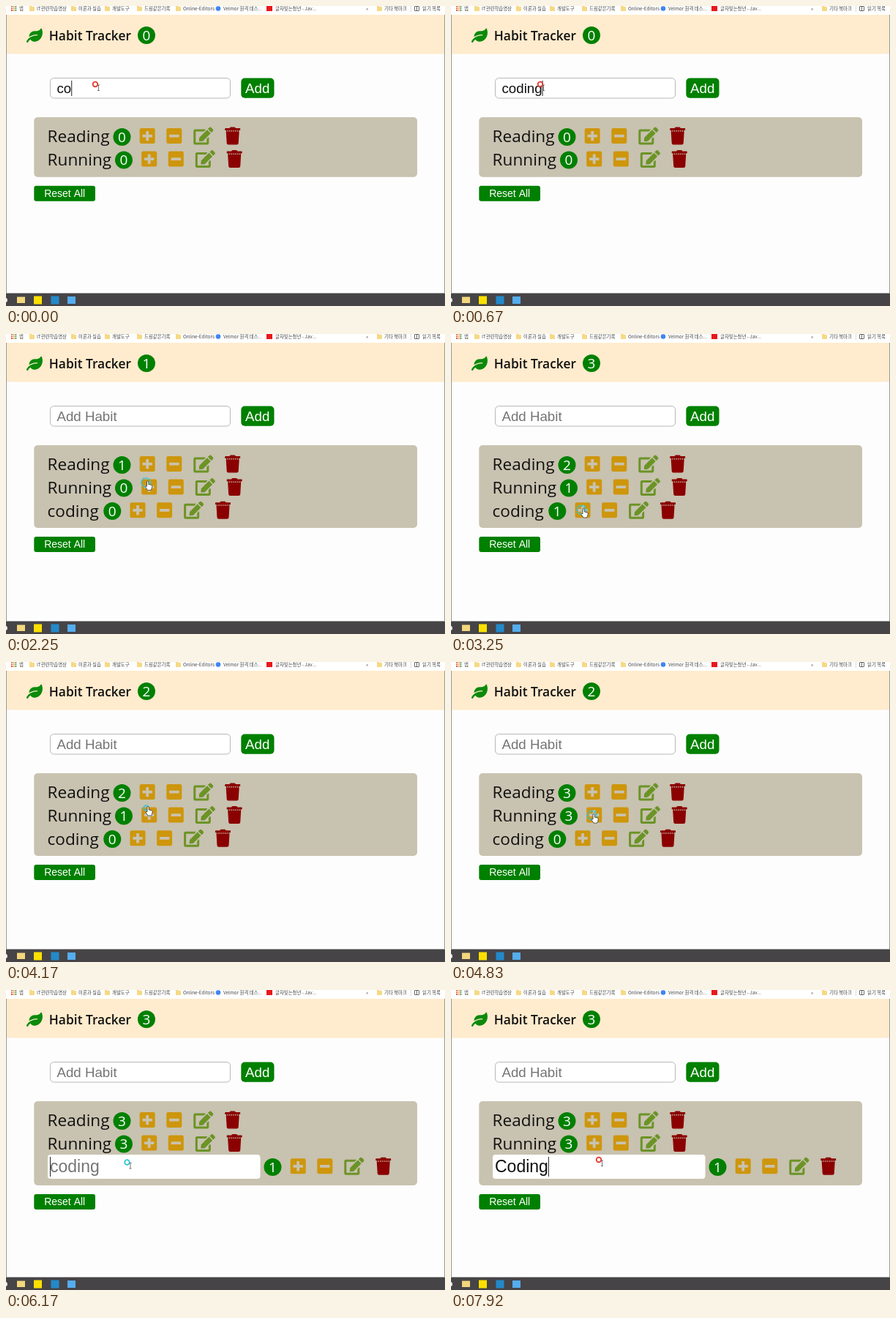
Write an HTML page with a canvas that moves like this. It is 600 by 410 pixels and loops after 8000 ms.

```html
<!DOCTYPE html>
<html lang="ko">
<head>
<meta charset="utf-8">
<title>Habit Tracker</title>
<style>
html, body { margin: 0; width: 100%; height: 100%; overflow: hidden; background: #fefdfe; }
canvas { display: block; width: 600px; height: 410px; }
</style>
</head>
<body>
<canvas id="stage"></canvas>
<script>
const LOOP = 8000, ADDED = 1000, EDITING = 5750, ENGLISH = 6500;
const GREEN = '#008000', PANEL = '#c8c2b0', FOLDER = '#f6d983';
const SANS = '"Open Sans", sans-serif';
const ARIAL = '"Liberation Sans", Arial, sans-serif';
const KOREAN = '"Noto Sans CJK KR", "Noto Sans CJK", sans-serif';

const canvas = document.getElementById('stage');
const ctx = canvas.getContext('2d');
const dpr = window.devicePixelRatio || 1;
canvas.width = 600 * dpr;
canvas.height = 410 * dpr;

// Icons are drawn on a 512-unit high grid.
const LEAF = new Path2D('M546 10c-6-13-22-13-28-1C487 62 431 96 368 96h-80C182 96 96 182 96 288c0 7 1 14 1.500 20.500C161 263 253 224 384 224c9 0 16 7 16 16s-7 16-16 16C133 256 26 410 2 468c-6 16 1 35 18 42 16 6 35-1 42-18 1-4 21-48 72-90 32 44 94 86 175 77C465 467 576 327 576 154c0-50-11-102-30-144z');
const PENCIL = new Path2D('M403 83l90 90c4 4 4 10 0 14L274 406l-93 10c-12 1-22-9-21-22l10-92L389 83c4-4 10-4 14 0zM565 60l-49-49c-15-15-40-15-55 0l-36 36c-4 4-4 10 0 14l90 90c4 4 10 4 14 0l36-36c15-15 15-40 0-55zM384 346V448H64V128h230c3 0 6-1 8-3l40-40c8-8 3-21-8-21H48C21 64 0 85 0 112v352c0 27 21 48 48 48h352c27 0 48-21 48-48V306c0-11-13-16-20-8l-40 40c-3 2-4 5-4 8z');
const TRASH = new Path2D('M432 32H312l-9-19Q296 0 281 0H167Q152 0 145 13L136 32H16Q0 32 0 48v32q0 16 16 16h416q16 0 16-16V48q0-16-16-16zM53 467q3 45 48 45h246q45 0 48-45L416 128H32z');
for (let x = 40; x < 416; x += 56) TRASH.rect(x, 96, 28, 32);
const HAND = new Path2D('M-3-6Q-1.800-7-.700-6V-2L3-1.200Q4.500-.700 4.300 1L3.500 4 2.500 6H-2L-5 1.500Q-5-.200-3 .800z');
const ARROW = new Path2D('M-4-5V5l2.500-2 1.700 4 2-1-1.700-3.700H3z');

// Pointer stops: time, x, y
const PATH = [
  [0, 126.5, 111.5], [670, 126.5, 111.5], [1000, 334.5, 115], [1170, 334.5, 115],
  [1500, 197, 181], [1750, 197, 181], [2200, 195.5, 207.5], [2420, 195.5, 207.5],
  [2700, 196, 183], [2850, 196, 183], [3080, 183, 245], [3300, 183, 245],
  [3600, 220, 245], [4000, 220, 245], [4170, 196, 204], [4300, 196, 183],
  [4420, 196, 183], [4620, 198, 212], [4800, 198, 212], [5000, 183, 245],
  [5120, 183, 245], [5450, 258, 247], [5750, 258, 247], [6170, 170, 240],
  [7915, 170, 240], [7915, 206.5, 236.5], [LOOP, 206.5, 236.5]
];
// Counter clicks: time, row, change
const CLICKS = [
  [1580, 0, 1], [2330, 1, 1], [2750, 0, 1], [3250, 2, 1], [4000, 2, -1],
  [4330, 0, 1], [4670, 1, 1], [4750, 1, 1], [5080, 2, 1]
];
const ROWS = [['Reading', 158.5, 177.6], ['Running', 161, 209.1], ['coding', 145.3, 240.8]];
const FIRST_KEYS = [0, 0, 80, 170, 250, 330];
const EDIT_KEYS = [7000, 7170, 7330, 7415, 7500, 7670];

const typed = (word, times, t) => word.slice(0, times.filter(k => t >= k).length);

function rect(x, y, w, h, color, r = 0, border) {
  ctx.beginPath();
  ctx.roundRect(x, y, w, h, r);
  ctx.fillStyle = color;
  ctx.fill();
  if (border) {
    ctx.strokeStyle = border;
    ctx.lineWidth = 1;
    ctx.stroke();
  }
}

function circle(x, y, r, color) {
  ctx.beginPath();
  ctx.arc(x, y, r, 0, 7);
  ctx.fillStyle = color;
  ctx.fill();
}

function text(str, x, y, font, color, align = 'left') {
  ctx.font = font;
  ctx.fillStyle = color;
  ctx.textAlign = align;
  ctx.fillText(str, x, y);
  return ctx.measureText(str).width;
}

function icon(path, x, y, size, color) {
  ctx.save();
  ctx.translate(x, y);
  ctx.scale(size / 512, size / 512);
  ctx.fillStyle = color;
  ctx.fill(path);
  ctx.restore();
}

function badge(x, y, n) {
  circle(x, y, 12, GREEN);
  text(n, x, y + 7, '19px ' + SANS, '#fff', 'center');
}

function square(x, y, plus) {
  rect(x - 10.5, y - 10.5, 21, 21, '#ce960c', 2.3);
  rect(x - 6.7, y - 1.9, 13.4, 3.8, PANEL, 0.5);
  if (plus) rect(x - 1.9, y - 6.7, 3.8, 13.4, PANEL, 0.5);
}

function folder(x) {
  rect(x, 0, 3.5, 2, FOLDER);
  rect(x, 1, 7, 6, FOLDER, 0.5);
}

function drawBrowser() {
  rect(0, 0, 600, 12, '#fff');
  const label = (str, x) => text(str, x, 5.7, '6.4px ' + KOREAN, '#444');
  for (let i = 0; i < 9; i++)
    rect(7 + i % 3 * 2.7, Math.floor(i / 3) * 2.7 - 0.3, 1.9, 1.9, ['#e2574c', '#e9a23b', '#5a9a62'][i % 3]);
  label('앱', 18);
  const marks = [[32, 'IT관련학습영상'], [89, '이론과 실습'], [135, '개발도구'],
    [179, '드림같은기록'], [232, 'Online-Editors'], [507, '기타 북마크']];
  for (const [x, name] of marks) {
    folder(x);
    label(name, x + 10);
  }
  circle(290, 3.5, 3.3, '#4285f4');
  label('Velmor 원격 데스...', 297);
  rect(356, 0, 8, 7, '#e8191c');
  label('글자빚는청년 - Jav...', 368);
  label('»', 492);
  rect(553, 0, 0.7, 8, '#ccc');
  rect(558.5, 0.5, 6, 6, '#fff', 0.5, '#666');
  rect(561, 0, 1, 7, '#666');
  label('읽기 목록', 569);

  rect(0, 392.6, 600, 17.4, '#464446');
  circle(-1.5, 402, 3.5, '#eee');
  rect(15, 397.5, 11, 8.5, '#f4d77c');
  rect(38, 396.5, 11, 11, '#fae100');
  rect(61.5, 396.5, 11, 11, '#2489ca');
  rect(84, 397, 11, 10, '#55acee');
}

function drawHeader(total) {
  rect(0, 12, 600, 53.5, '#ffebcd');
  icon(LEAF, 28, 30.5, 19.5, '#0b8a0b');
  text('Habit Tracker', 58.8, 46.7, '600 17.4px ' + SANS, '#111');
  badge(192, 40, total);
}

function caret(x, y, h) {
  rect(x, y, 1, h, '#222');
}

function drawForm(t) {
  const font = '18.7px ' + ARIAL;
  rect(60.5, 98.5, 246, 27.5, '#fff', 5, '#b8b8b8');
  if (t < ADDED) {
    const w = text(typed('coding', FIRST_KEYS, t), 69.5, 118.7, font, '#111');
    caret(69.5 + w, 102, 21);
  } else {
    text('Add Habit', 69.5, 118.7, font, '#757575');
  }
  rect(321.3, 98.5, 45.2, 27.2, GREEN, 5);
  text('Add', 343.7, 118.5, font, '#fff', 'center');
}

function drawEditor(t) {
  const font = '23px ' + ARIAL;
  rect(57, 225, 290.5, 33, '#fff', 4);
  const value = typed('Coding', EDIT_KEYS, t);
  const w = text(value || 'coding', 60, 249.3, font, value ? '#111' : '#757575');
  const blinkedOff = t >= 6670 && t < 7000;
  if (!blinkedOff) caret(60 + (value ? w : 0), 228, 27);
}

function drawList(t, counts) {
  const editing = t >= EDITING;
  const bottom = editing ? 267 : t >= ADDED ? 265 : 233.7;
  rect(38.3, 152, 523.7, bottom - 152, PANEL, 5);
  ROWS.forEach(([name, badgeX, y], i) => {
    if (i === 2 && t < ADDED) return;
    let x = badgeX;
    if (i === 2 && editing) {
      drawEditor(t);
      x = 364.5;
    } else {
      text(name, 56.6, y + 8.7, '22.6px ' + SANS, '#111');
    }
    badge(x, y + 1.3, counts[i]);
    square(x + 34.7, y, true);
    square(x + 71.3, y, false);
    icon(PENCIL, x + 97.8, y - 12, 24, '#6b9426');
    icon(TRASH, x + 140.7, y - 12, 24, '#8b0000');
  });
  rect(38.3, bottom + 12, 83.7, 21, GREEN, 3);
  text('Reset All', 80.2, bottom + 27, '14px ' + ARIAL, '#fff', 'center');
}

function pointerAt(t) {
  const i = Math.max(1, PATH.findIndex(p => p[0] > t));
  const [t0, x0, y0] = PATH[i - 1], [t1, x1, y1] = PATH[i];
  const u = (t - t0) / (t1 - t0), e = u * u * (3 - 2 * u);
  return [x0 + (x1 - x0) * e, y0 + (y1 - y0) * e];
}

function pointerKind(x, y, t) {
  const within = (l, top, r, b) => x > l && x < r && y > top && y < b;
  if (within(60, 98, 306, 126)) return 'text';
  if (t >= EDITING && within(57, 225, 347, 258)) return 'text';
  if (within(321, 98, 366, 126) || within(180, 166, 284, 255)) return 'hand';
  return 'arrow';
}

function drawPointer(t) {
  const [x, y] = pointerAt(t);
  const kind = pointerKind(x, y, t);
  const pressed = CLICKS.some(([c]) => t >= c - 90 && t < c + 160);
  const red = kind === 'text' && (t < ADDED || t >= ENGLISH);

  ctx.beginPath();
  ctx.arc(x - 4.5, y - 4.5, pressed ? 6 : 3.3, 0, 7);
  ctx.strokeStyle = red ? '#e8392e' : '#35c4d8';
  ctx.lineWidth = pressed ? 2.4 : 1.8;
  ctx.setLineDash(pressed ? [2.2, 1.2] : []);
  ctx.stroke();
  ctx.setLineDash([]);

  ctx.save();
  ctx.translate(x, y);
  ctx.lineWidth = 0.8;
  if (kind === 'text') {
    ctx.beginPath();
    ctx.moveTo(-1.5, -3.5);
    ctx.lineTo(1.5, -3.5);
    ctx.moveTo(0, -3.5);
    ctx.lineTo(0, 4);
    ctx.moveTo(-1.5, 4);
    ctx.lineTo(1.5, 4);
    ctx.strokeStyle = '#555';
    ctx.stroke();
  } else {
    const shape = kind === 'hand' ? HAND : ARROW;
    ctx.fillStyle = '#fff';
    ctx.strokeStyle = '#333';
    ctx.fill(shape);
    ctx.stroke(shape);
  }
  ctx.restore();
}

function draw(t) {
  const counts = [0, 0, 0];
  for (const [time, row, change] of CLICKS) if (t >= time) counts[row] += change;

  ctx.setTransform(dpr, 0, 0, dpr, 0, 0);
  rect(0, 0, 600, 410, '#fefdfe');
  drawBrowser();
  drawHeader(counts.filter(n => n > 0).length);
  drawForm(t);
  drawList(t, counts);
  for (const x of [0, 599]) rect(x, 12, 1, 381, '#999');
  drawPointer(t);
}

const start = performance.now();
function tick() {
  draw((performance.now() - start) % LOOP);
  requestAnimationFrame(tick);
}
tick();
</script>
</body>
</html>
```
